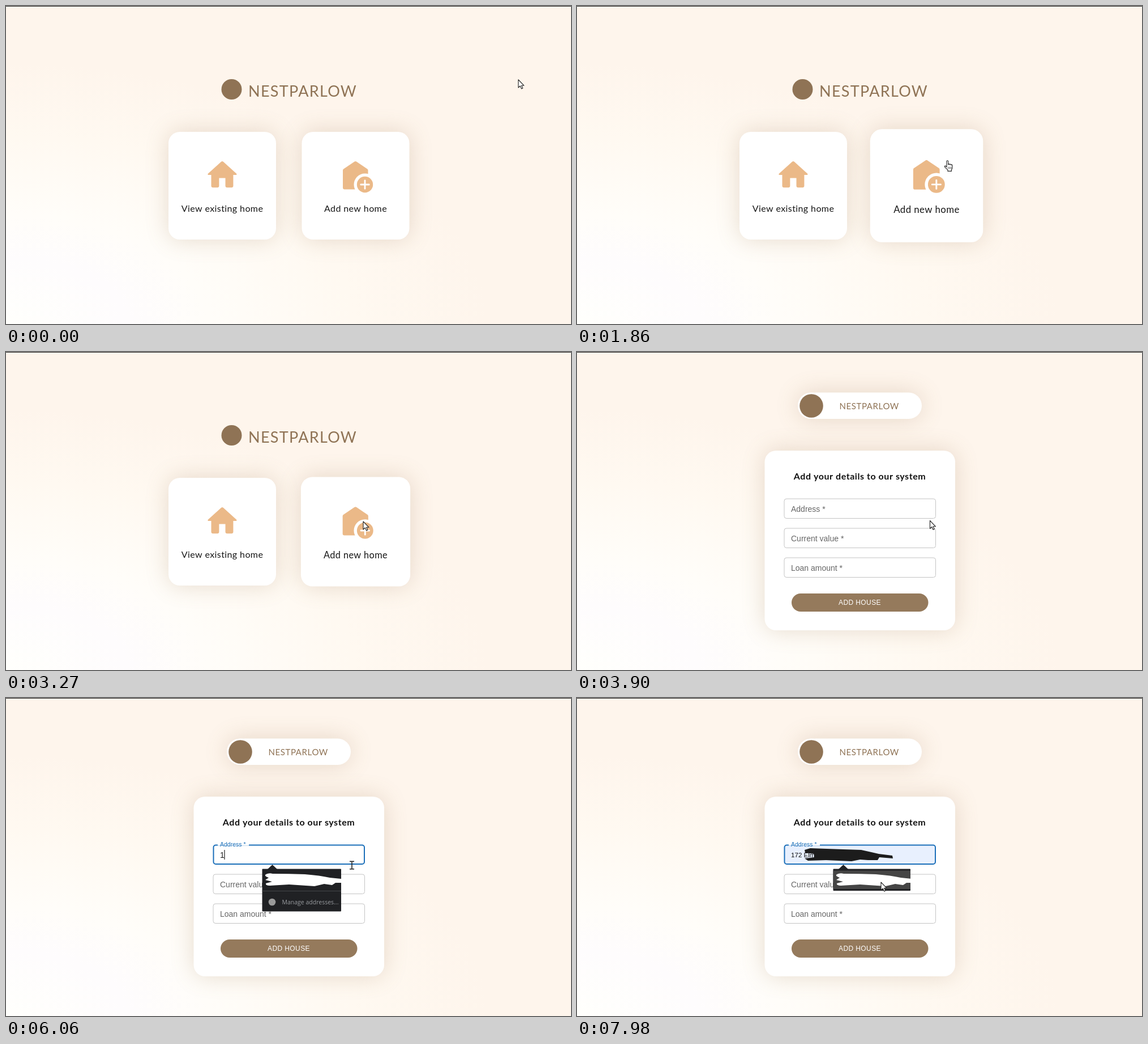
An HTML page with a canvas that plays this animation: 998x561 px, repeating every 8 s.

```html
<!DOCTYPE html>
<html lang="en">
<head>
<meta charset="utf-8">
<title>Add a home</title>
<style>
html, body { margin: 0; width: 100%; height: 100%; overflow: hidden; }
canvas { display: block; }
</style>
</head>
<body>
<canvas id="stage" width="998" height="561"></canvas>
<script>
const c = document.getElementById('stage').getContext('2d');
const LOOP = 8000, FORM = 3480, FOCUS = 4800, PREVIEW = 7680;
const BROWN = '#957a5c', BRAND = '#8f7355', PEACH = '#ebb988', BLUE = '#1b6fb9', DARK = '#202124';
const SANS = '"Liberation Sans", Arial, sans-serif', ROUND = 'Lato, sans-serif';
const NAME = 'NESTPARLOW';

const homeIcon = new Path2D('M10 19v-5h4v5c0 .55.45 1 1 1h3c.55 0 1-.45 1-1v-7h1.7c.46 0 .68-.57.33-.87L12.67 3.6c-.38-.34-.96-.34-1.34 0l-8.36 7.53c-.34.3-.13.87.33.87H5v7c0 .55.45 1 1 1h3c.55 0 1-.45 1-1z');
const newHomeIcon = new Path2D('M-19.5-27L-.2-40L19-27V3.5H-19.5Z');
const whiteScribble = new Path2D('M459 311Q465 308 471 310Q500 310 528 311Q555 313 572 317L592 319V326L582 326L576 330L562 328L545 332L500 329L466 331Q458 331 459 327L470 324L458 321L464 317Q455 314 459 311Z');
const blackScribble = new Path2D('M402 268L412 265L470 267L502 268L520 272L533 275L557 278L558 283L534 281L531 286L514 286L500 285L485 288L440 286L408 287L402 283L419 281L419 275L403 273Z');
const arrow = new Path2D('M0 0V14L3.3 11L5.6 16L7.8 15L5.6 10.3H10Z');
const hand = new Path2D('M-1.2 11V1a1.4 1.4 0 0 1 2.8 0v6q0-1.5 1.3-1.5t1.3 1.7q0-1.3 1.3-1.3t1.3 1.7q0-1 1-1t1 1.5v4q0 2-1.5 4v2.2H.8V16L-4.5 11q-1-2 .8-2q1 0 2.5 2z');

// Cursor path: time, x, y
const path = [
  [720, 905, 130], [870, 855, 158], [1150, 712, 245], [1290, 665, 268], [1410, 655, 273],
  [1860, 655, 273], [2010, 521, 288], [2070, 476, 296], [2160, 425, 304], [2370, 422, 305],
  [2440, 478, 303], [2469, 523, 301], [2520, 594, 298], [2640, 625, 298], [2820, 631, 299],
  [3630, 631, 299], [4350, 611, 295], [7000, 611, 295], [7560, 537, 325]
];
// Times at which hovering turns on and off
const hoverLeft = [2070, 2440], hoverRight = [1150, 2010, 2469, 3155];

const clamp = v => Math.max(0, Math.min(1, v));
const mix = (a, b, p) => a + (b - a) * p;
const isHovered = (times, t) => times.filter(v => v <= t).length % 2 === 1;

// CSS "ease"
function ease(x) {
  if (x <= 0 || x >= 1) return clamp(x);
  let lo = 0, hi = 1, s;
  for (let i = 0; i < 14; i++) {
    s = (lo + hi) / 2;
    if (.75 * s * (1 - s) + s ** 3 < x) lo = s; else hi = s;
  }
  return .3 * s * (1 - s) ** 2 + 3 * (1 - s) * s * s + s ** 3;
}

const hoverAmount = (times, t) =>
  times.reduce((sum, v, i) => sum + (i % 2 ? -1 : 1) * ease((t - v) / 300), 0);

function cursorAt(t) {
  const next = path.findIndex(k => k[0] > t);
  if (next === 0) return path[0].slice(1);
  if (next < 0) return path[path.length - 1].slice(1);
  const a = path[next - 1], b = path[next], p = (t - a[0]) / (b[0] - a[0]);
  return [mix(a[1], b[1], p), mix(a[2], b[2], p)];
}

function box(x, y, w, h, r, fill) {
  c.beginPath();
  c.roundRect(x, y, w, h, r);
  c.fillStyle = fill;
  c.fill();
}

function panel(x, y, w, h, r) {
  c.save();
  c.shadowColor = 'rgba(149,112,72,.23)';
  c.shadowBlur = 40;
  box(x, y, w, h, r, '#fff');
  c.restore();
}

function disc(x, y, r, fill) {
  c.beginPath();
  c.arc(x, y, r, 0, 7);
  c.fillStyle = fill;
  c.fill();
}

function text(str, x, y, font, fill, align = 'left', spacing = 0) {
  c.font = font;
  c.fillStyle = fill;
  c.textAlign = align;
  c.letterSpacing = spacing + 'px';
  c.fillText(str, x, y);
}

function background() {
  c.fillStyle = '#fef5ec';
  c.fillRect(0, 0, 998, 561);
  c.save();
  c.translate(0, 561);
  c.scale(850, 460);
  const g = c.createRadialGradient(0, 0, 0, 0, 0, 1);
  [[0, '#fffffc'], [.25, '#fefcfd'], [.42, '#fffdf9'], [.72, '#fff9f1'], [1, '#fef5ec']]
    .forEach(([p, color]) => g.addColorStop(p, color));
  c.fillStyle = g;
  c.fillRect(0, -1, 1, 1);
  c.restore();
  c.fillStyle = '#2a2a2a';
  c.fillRect(0, 0, 998, 1);
}

function choiceCard(x, label, hover, drawIcon) {
  c.save();
  c.translate(x, 317);
  c.scale(1 + .05 * hover, 1 + .05 * hover);
  panel(-95, -95, 190, 190, 20);
  drawIcon();
  text(label, 0, 46, '16px ' + ROUND, '#161616', 'center', .4);
  c.restore();
}

function drawHome() {
  c.save();
  c.translate(-33.4, -52.3);
  c.scale(2.78, 2.78);
  c.fillStyle = PEACH;
  c.fill(homeIcon);
  c.restore();
}

function drawNewHome() {
  c.fillStyle = c.strokeStyle = PEACH;
  c.lineWidth = 6;
  c.lineJoin = 'round';
  c.fill(newHomeIcon);
  c.stroke(newHomeIcon);
  disc(16.5, -2, 19.5, '#fff');
  disc(16.5, -2, 14.2, PEACH);
  box(8, -3.4, 17, 2.8, 1, '#fff');
  box(15.1, -10.5, 2.8, 17, 1, '#fff');
}

function choicePage(t) {
  disc(398.5, 147, 18, BRAND);
  text(NAME, 428, 159.5, '27px ' + ROUND, BRAND, 'left', 1.3);
  choiceCard(382, 'View existing home', hoverAmount(hoverLeft, t), drawHome);
  choiceCard(617.5, 'Add new home', hoverAmount(hoverRight, t), drawNewHome);
}

function field(y, color, width, fill = '#fff') {
  const inset = width / 2;
  box(365.5 + inset, y + inset, 268.5 - width, 35.5 - width, 4, fill);
  c.strokeStyle = color;
  c.lineWidth = width;
  c.stroke();
}

function addressField(t) {
  const focused = t >= FOCUS, preview = t >= PREVIEW;
  const p = 1 - (1 - clamp((t - FOCUS) / 200)) ** 3;
  const border = focused ? BLUE : t >= 4200 ? '#212121' : '#c4c4c4';
  field(258.5, border, focused ? 2 : 1, preview ? '#e8f0fe' : '#fff');
  if (p > .2) {
    c.fillStyle = '#fff';
    c.fillRect(374, 257, 55 * p, 3.5);
  }
  text('Address *', 378, mix(282, 262, p), mix(14, 10.5, p) + 'px ' + SANS, p > .3 ? BLUE : '#666');
  if (preview) {
    text('172 Elm', 378, 281, '11.6px ' + SANS, '#111');
    c.fillStyle = '#1c1c1c';
    c.fill(blackScribble);
    return;
  }
  const typed = '172'.slice(0, [5760, 6300, 6600].filter(v => v <= t).length);
  text(typed, 378, 282, '14px ' + SANS, '#222');
  const blink = t < 5490 || (t >= 5760 && t < 6600) || (t >= 6600 && (t - 6600) % 1000 < 500);
  if (focused && blink) {
    c.fillStyle = '#222';
    c.fillRect(377.6 + c.measureText(typed).width, 268, 1.2, 17);
  }
}

function suggestions(t) {
  if (t < 4680) return;
  const open = t >= 4890, single = t >= 6300, active = t >= PREVIEW;
  const width = single ? 136.5 : 139.5;
  c.save();
  if (open) {
    c.globalAlpha = clamp((t - 4890) / 150);
    c.beginPath();
    c.moveTo(462, 302);
    c.lineTo(470.5, 294);
    c.lineTo(479, 302);
    c.fillStyle = DARK;
    c.fill();
    box(452.5, 301.5, width, single ? 38.5 : 75, 1, DARK);
    if (active) box(452.5, 304.5, width, 32.5, 0, '#454545');
    if (!single) {
      c.fillStyle = '#46484b';
      c.fillRect(452.5, 340, width, 1);
      disc(470, 360, 6.3, '#9a9a9a');
      text('Manage addresses...', 487.5, 364, '10.5px "Open Sans", sans-serif', '#9a9da1');
    }
    c.globalAlpha = 1;
    c.beginPath();
    c.rect(452.5, 301, width, 40);
    c.clip();
  } else {
    c.translate(3, 0);
  }
  c.fillStyle = '#fff';
  c.fill(whiteScribble);
  c.restore();
}

function formPage(t) {
  panel(390, 71.5, 219, 46.5, 23.2);
  disc(414, 95, 20.8, BRAND);
  text(NAME, 463.5, 100.5, '15px ' + ROUND, BRAND, 'left', .6);
  panel(331.5, 174, 336.5, 317, 20);
  text('Add your details to our system', 499.5, 225, 'bold 16px ' + ROUND, '#111', 'center', .55);
  field(310.5, '#c4c4c4', 1);
  field(362.5, '#c4c4c4', 1);
  text('Current value *', 378, 334, '14px ' + SANS, '#666');
  text('Loan amount *', 378, 386, '14px ' + SANS, '#666');
  box(379, 426, 241.5, 32, 16, BROWN);
  text('ADD HOUSE', 499.5, 446, '12px ' + SANS, '#fff', 'center', .4);
  addressField(t);
  suggestions(t);
}

function pointer(t) {
  const [x, y] = cursorAt(t);
  c.save();
  c.translate(x, y);
  if (t >= 4200 && t < 7180) {
    c.fillStyle = '#222';
    c.fillRect(-.8, -7, 1.6, 14);
    c.fillRect(-4, -7.5, 8, 1.5);
    c.fillRect(-4, 6, 8, 1.5);
  } else {
    const shape = isHovered(hoverLeft, t) || isHovered(hoverRight, t) ? hand : arrow;
    c.fillStyle = '#fff';
    c.strokeStyle = '#222';
    c.lineWidth = 1.1;
    c.lineJoin = 'round';
    c.fill(shape);
    c.stroke(shape);
    if (shape === hand) {
      for (let i = 0; i < 3; i++) {
        c.fillStyle = '#222';
        c.fillRect(1.4 + i * 2.5, 10.5, .8, 4);
      }
    }
  }
  c.restore();
}

function draw(now) {
  const t = now % LOOP;
  background();
  (t < FORM ? choicePage : formPage)(t);
  pointer(t);
  requestAnimationFrame(draw);
}
requestAnimationFrame(draw);
</script>
</body>
</html>
```
